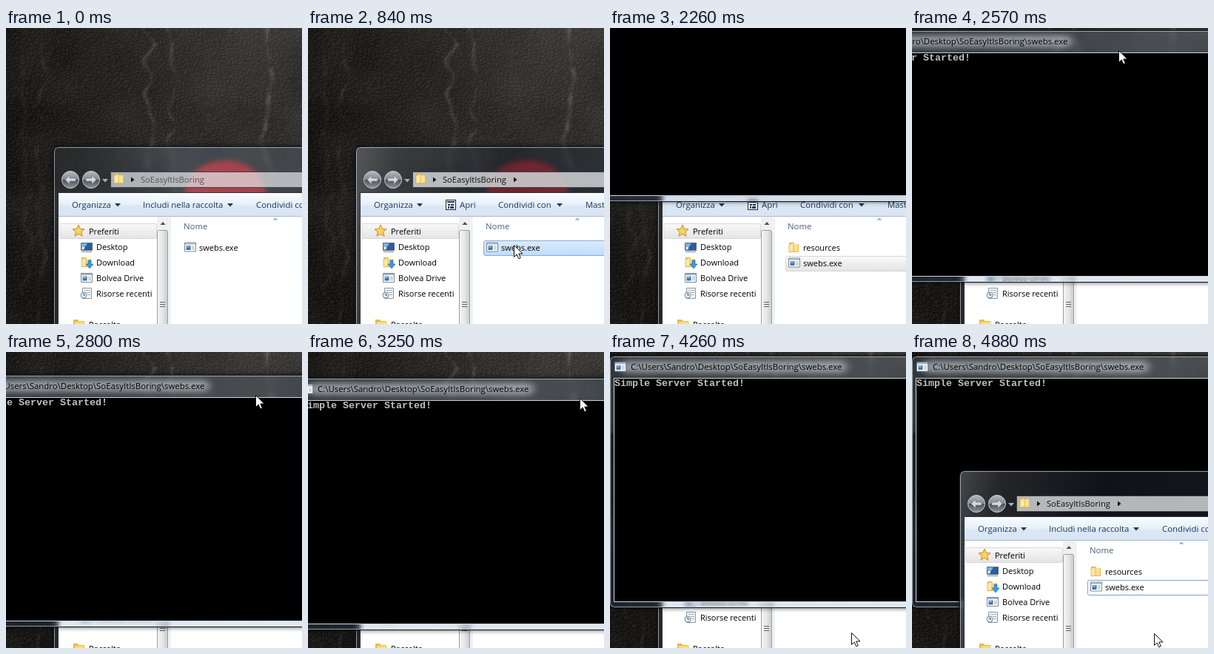
Write an HTML page with a canvas that moves like this. It is 400x400 px and loops after 5340 ms.

```html
<!DOCTYPE html>
<html lang="it">
<head>
<meta charset="utf-8">
<title>Simple Server</title>
<style>
html, body { margin: 0; width: 100%; height: 100%; overflow: hidden; background: #222; }
#stage { position: relative; width: 400px; height: 400px; overflow: hidden; }
#stage > *, svg { position: absolute; left: 0; top: 0; }
svg { overflow: visible; }
text { font: 11px "Open Sans", "Noto Sans", sans-serif; white-space: pre; }
.layer { width: 400px; height: 400px; }
.glass {
  position: absolute; box-sizing: border-box; border: 1px solid #15181b; border-radius: 7px;
  box-shadow: inset 0 0 0 1px rgba(215,228,240,.6), 0 0 6px rgba(0,0,0,.7);
  -webkit-backdrop-filter: blur(3px); backdrop-filter: blur(3px);
}
#explorer .glass {
  left: 64px; top: 160px; width: 420px; height: 320px;
  background: linear-gradient(100deg, rgba(110,125,140,.12) 5%, rgba(125,148,170,.3) 40%, rgba(100,120,140,.2));
}
#explorer.active .glass {
  background: linear-gradient(100deg, rgba(160,165,170,.42), rgba(120,125,135,.3) 12%, rgba(30,36,48,.5) 42%, rgba(50,62,78,.4));
}
#console .glass {
  left: -1px; top: 5px; width: 671px; height: 341px;
  background: linear-gradient(rgba(125,150,175,.22), rgba(150,170,190,.2) 30%, rgba(60,75,95,.2) 31%, rgba(70,110,170,.16));
}
.bar text { font-size: 11.4px; fill: #1e395b; }
.bar path { fill: #1e395b; }
#term { font: bold 13.33px "Liberation Mono", "DejaVu Sans Mono", monospace; fill: #c0c0c0; }
</style>
</head>
<body>
<div id="stage">
  <canvas id="wall" width="400" height="400"></canvas>

  <div id="explorer" class="layer">
    <div class="glass"></div>
    <svg width="400" height="400">
      <defs>
        <linearGradient id="gBar" x2="0" y2="1"><stop stop-color="#fafcfe"/><stop offset=".5" stop-color="#e6eff9"/><stop offset=".52" stop-color="#dce7f5"/><stop offset="1" stop-color="#d9e5f4"/></linearGradient>
        <linearGradient id="gGray" x2="0" y2="1"><stop stop-color="#f9f9f9"/><stop offset="1" stop-color="#e4e4e4"/></linearGradient>
        <linearGradient id="gHover" x2="0" y2="1"><stop stop-color="#fafbfd"/><stop offset="1" stop-color="#ebf3fd"/></linearGradient>
        <linearGradient id="gBlue" x2="0" y2="1"><stop stop-color="#dcebfc"/><stop offset="1" stop-color="#c1dbfc"/></linearGradient>
        <linearGradient id="gBtn" x2="0" y2="1"><stop stop-color="#b4babf"/><stop offset=".48" stop-color="#82898f"/><stop offset=".52" stop-color="#4c5359"/><stop offset="1" stop-color="#8d969d"/></linearGradient>
        <linearGradient id="gThumb"><stop stop-color="#f5f5f5"/><stop offset=".5" stop-color="#e6e7e8"/><stop offset="1" stop-color="#c9cbcf"/></linearGradient>
        <g id="folder">
          <path d="M1 2h6l1 2h6v11H1z" fill="#e6b94d"/><path d="M2 4h11v10H2z" fill="#f9e190"/>
          <path d="M1 15V5l6-3v12z" fill="#fbe9a8" stroke="#d9ab41" stroke-width=".7"/>
        </g>
        <g id="app">
          <path d="M.5 1.5h15v12H.5z" fill="#fff" stroke="#7e8790"/><path d="M1 2h14v2H1z" fill="#9fb3c6"/>
          <path d="M2.5 5.500h6v6h-6z" fill="#3f74a9"/><path d="M3 6h4v2H3z" fill="#8fbadd"/>
          <path d="M10 6.500h4M10 8.500h4M10 10.500h4" stroke="#a9b0b8"/>
        </g>
        <path id="down" d="M-4-2h8L0 2.500z"/>
      </defs>

      <circle cx="87" cy="205" r="11.500" fill="url(#gBtn)" stroke="#c6cdd2"/>
      <circle cx="115" cy="205" r="11.500" fill="url(#gBtn)" stroke="#c6cdd2"/>
      <path d="M80 205l6-6v4h8v4h-8v4zM122 205l-6-6v4h-8v4h8v4z" fill="#d4d8db" stroke="#6a7177" stroke-width=".6"/>
      <use href="#down" x="134" y="206" fill="#aab0b5"/>

      <rect id="address" x="141.500" y="194.500" width="280" height="21" stroke="#3c4146"/>
      <use href="#folder" x="145" y="195"/>
      <path d="M169 201.500l4.500 3.500-4.500 3.500z" fill="#111"/>
      <text id="crumb" x="182" y="209" style="font-size:11.150px">SoEasyItIsBoring</text>
      <path id="crumbEnd" d="M278 201.500l4.500 3.500-4.500 3.500z" fill="#111"/>

      <path d="M70.500 400V222.500H400" fill="none" stroke="#2d3339"/>
      <rect x="71" y="223" width="340" height="190" fill="#fff"/>
      <rect x="71" y="223" width="340" height="32" fill="url(#gBar)"/>
      <path d="M71 254.500H400" stroke="#a9bacd"/>
      <g class="bar">
        <text x="89" y="243">Organizza</text><use href="#down" x="151" y="239" fill="#1e395b"/>
        <g id="barIdle">
          <text x="185" y="243">Includi nella raccolta</text><use href="#down" x="303" y="239" fill="#1e395b"/>
          <text x="338" y="243">Condividi con</text>
        </g>
        <g id="barFile">
          <rect x="186.500" y="232.500" width="13" height="13" fill="#fff" stroke="#222"/>
          <path d="M188 234h10v2h-10zM189 238h3v2h-3zM193 238h4v2h-4zM189 241h2v3h-2zM192 241h5v3h-5z"/>
          <text x="205" y="243">Apri</text>
          <text x="257" y="243">Condividi con</text><use href="#down" x="340" y="239" fill="#1e395b"/>
          <text x="375" y="243">Masterizza</text>
        </g>
      </g>

      <rect x="72.500" y="264.500" width="131" height="20" rx="2" fill="url(#gGray)" stroke="#d6d6d6"/>
      <path d="M98 266l2.300 5.300 5.700.6-4.300 3.800 1.300 5.600-5-3-5 3 1.300-5.600-4.300-3.800 5.700-.6z" fill="#fbd35b" stroke="#c78a2b"/>
      <text x="112" y="279">Preferiti</text>
      <path d="M101.500 290.500h15v10h-15z" fill="#2c5f9e" stroke="#5d6873"/><path d="M102 291h8l-6 9h-2z" fill="#7fb1de"/>
      <path d="M103 296h3v3h-3z" fill="#e8f0f8"/><path d="M102 302.500h14" stroke="#7b8690"/>
      <text x="122" y="300">Desktop</text>
      <use href="#folder" x="101" y="308"/>
      <path d="M111 314h4v5h3l-5 6-5-6h3z" fill="#3c9be0" stroke="#1d67a8" stroke-width=".7"/>
      <text x="122" y="321">Download</text>
      <use href="#app" x="101" y="330"/>
      <text x="122" y="342">Bolvea Drive</text>
      <path d="M103.500 351.500h12v14h-12z" fill="#f2f5f8" stroke="#8b97a3"/>
      <path d="M106 354.500h8M109 357.500h5M110 360.500h4" stroke="#9fb0c0"/>
      <circle cx="105" cy="361" r="4" fill="#e2eef8" stroke="#6f8ba6"/><path d="M105 358.500v2.500h2" fill="none" stroke="#345"/>
      <text x="122" y="363">Risorse recenti</text>
      <path d="M91 394h6l1 2h8v8H91z" fill="#e6b94d"/><path d="M93 397h14v5H93z" fill="#f9dc7f"/>
      <text x="112" y="405">Raccolte</text>

      <rect x="204" y="255" width="16" height="150" fill="#f0f0f0"/>
      <path d="M208.500 266h7l-3.500-4z" fill="#4a4f55"/>
      <rect x="204.500" y="273.500" width="14" height="150" rx="2" fill="url(#gThumb)" stroke="#9a9da1"/>
      <path d="M208 370.500h7M208 373.500h7M208 376.500h7" stroke="#5c6268"/>
      <path d="M221.500 255V400" stroke="#d4e1f0"/>

      <rect id="head" x="223" y="255" width="200" height="25" fill="#e3f1fb"/>
      <path d="M360.500 259.500l3.500-3 3.500 3z" fill="#7fb2d8"/>
      <text x="240" y="272" style="font-size:11.400px" fill="#4c607a">Nome</text>
      <g id="res"><use href="#folder" x="241" y="288"/><text x="261" y="301">resources</text></g>
      <g id="file">
        <rect id="row" x="237.500" y="287.500" width="200" height="20" rx="2"/>
        <use href="#app" x="241" y="288.500"/><text x="261" y="301">swebs.exe</text>
      </g>
    </svg>
  </div>

  <div id="console" class="layer">
    <div class="glass"></div>
    <svg width="400" height="400">
      <defs><filter id="soft" x="-20%" y="-100%" width="140%" height="300%"><feGaussianBlur stdDeviation="6 4"/></filter></defs>
      <rect x="14" y="12" width="306" height="16" rx="8" fill="#e4ecf2" opacity=".55" filter="url(#soft)"/>
      <use href="#app" x="6" y="12.500"/>
      <text x="28" y="24" style="font-size:11.400px">C:\Users\Sandro\Desktop\SoEasyItIsBoring\swebs.exe</text>
      <rect x="5.500" y="35.500" width="658" height="302" stroke="#c9d6e0"/>
      <text id="term" x="6" y="46">Simple Server Started!</text>
      <rect x="646" y="36" width="17" height="301" fill="#f0f0f0"/>
      <rect x="646.500" y="320.500" width="16" height="16" fill="#f6f6f6" stroke="#e2e2e2"/>
      <path d="M651 327h7l-3.500 4z" fill="#3c4146"/>
    </svg>
  </div>

  <svg id="cursor" width="14" height="21" style="z-index:5">
    <path d="M.5.500v16l3.700-3.500 2.500 5.800 2.600-1.100-2.500-5.700h5.200z" fill="#fff" stroke="#111"/>
  </svg>
</div>

<script>
const $ = id => document.getElementById(id);
const LOOP = 5340;

// ---- leather wallpaper ----
function hash(x, y) {
  let n = Math.imul(x + 71, 374761393) ^ Math.imul(y + 13, 668265263);
  n = Math.imul(n ^ (n >>> 13), 1274126177);
  return ((n ^ (n >>> 16)) >>> 0) / 2 ** 32;
}
function noise(x, y) {
  const i = Math.floor(x), j = Math.floor(y), ease = u => u * u * (3 - 2 * u);
  const u = ease(x - i), v = ease(y - j);
  const mix = (a, b, k) => a + (b - a) * k;
  return mix(mix(hash(i, j), hash(i + 1, j), u), mix(hash(i, j + 1), hash(i + 1, j + 1), u), v);
}
// Height of a pebbled grain: low along cell borders.
function grain(x, y) {
  const px = x / 6 + noise(x / 9, y / 9) * 1.2, py = y / 5 + noise(y / 8, x / 8 + 40) * 1.2;
  const i = Math.floor(px), j = Math.floor(py);
  let near = 9, next = 9;
  for (let a = i - 1; a <= i + 1; a++) for (let b = j - 1; b <= j + 1; b++) {
    const d = Math.hypot(a + hash(a, b) - px, b + hash(b + 900, a) - py);
    if (d < near) { next = near; near = d; } else if (d < next) next = d;
  }
  return Math.min(1, (next - near) * 2.2);
}
function paintWall() {
  const N = 400, ctx = $('wall').getContext('2d'), img = ctx.createImageData(N, N);
  const streaks = [[192, 26], [223, 20], [352, 34], [48, 16], [28, 12]];
  const h = new Float32Array((N + 1) * (N + 1));
  for (let y = 0; y <= N; y++) for (let x = 0; x <= N; x++) h[y * (N + 1) + x] = grain(x, y);
  for (let y = 0; y < N; y++) for (let x = 0; x < N; x++) {
    const k = y * (N + 1) + x, relief = h[k + N + 2] - h[k];
    let v = 25 + 30 * Math.min(1, x / 280) * (1 - y / 600) + (noise(x / 40, y / 40) - .5) * 12;
    v += relief * 17 + (h[k] - .6) * 7 + (hash(x, y + 500) - .5) * 6;
    for (const [sx, power] of streaks) {
      const d = (x - sx - (noise(y / 22, sx) - .5) * 16) / 3;
      if (Math.abs(d) < 3) v += Math.exp(-d * d) * power * noise(y / 12, sx + 5);
    }
    img.data.set([v * 1.03, v, v * .96, 255], (y * N + x) * 4);
  }
  ctx.putImageData(img, 0, 0);
  ctx.fillStyle = '#b8252b';
  ctx.beginPath();
  ctx.ellipse(296, 222, 54, 43, 0, 0, 7);
  ctx.fill();
}

// ---- motion: [time, x, y], each held until the next ----
const drag = [[0, -282, -147], [2190, -255, -138], [2260, -215, -111], [2340, -183, -76], [2420, -150, -44],
  [2490, -125, -20], [2570, -103, -2], [2650, -80, 11], [2720, -58, 22], [2800, -45, 26], [2880, -34, 29],
  [2950, -25, 31], [3020, -19, 31], [3100, -16, 31], [3250, -15, 30], [3330, -11, 24], [3400, -7, 15],
  [3480, -4, 8], [3560, -1, 2], [3640, 0, 0]];
const pointer = [[0, 500, 262], [70, 392, 262], [140, 374, 292], [210, 346, 320], [290, 318, 333], [360, 300, 324],
  [430, 288, 308], [480, 281, 298], [540, 278, 293], [1710, 246, 112], [1780, 100, -115],
  [3790, 381, 48], [3870, 377, 92], [3950, 369, 158], [4030, 357, 235], [4100, 344, 306], [4180, 332, 357],
  [4260, 326, 379], [4800, 326, 380], [4880, 327, 380]];
const GRIP = [382, 32];

const looks = {
  none: ['none', 'none'], hover: ['url(#gHover)', '#b8d6fb'], picked: ['url(#gBlue)', '#84acdd'],
  idle: ['url(#gGray)', '#d6d6d6'], focus: ['#fff', '#7da2ce']
};
const rowSteps = [[0, 'none'], [430, 'hover'], [690, 'picked'], [1710, 'idle'], [4410, 'focus']];

const at = (steps, t) => steps.findLast(s => s[0] <= t);
const within = (t, a, b) => t >= a && t < b;
const show = (id, on) => $(id).style.display = on ? '' : 'none';

function draw(t) {
  const [, dx, dy] = at(drag, t);
  const held = within(t, 2190, 3790);
  const [, px, py] = held ? [0, dx + GRIP[0], dy + GRIP[1]] : at(pointer, t);
  $('cursor').style.transform = `translate(${px}px,${py}px)`;

  // The console fades and grows in, one step at a time.
  const grow = Math.min(1, Math.floor((t - 930) / 80) / 3);
  const con = $('console').style;
  show('console', grow > 0);
  con.opacity = grow >= 1 ? 1 : Math.max(0, grow);
  con.transformOrigin = '335px 175px';
  con.transform = `translate(${dx}px,${dy}px)` + (grow < 1 ? ` scale(${.9 + grow * .1})` : '');

  const active = within(t, 690, 1010) || t >= 4340;
  $('explorer').classList.toggle('active', active);
  $('explorer').style.zIndex = t >= 4340 ? 2 : 0;
  con.zIndex = 1;
  $('address').setAttribute('fill', active ? 'rgba(208,210,212,.86)' : 'rgba(235,238,240,.68)');
  $('crumb').setAttribute('fill', active ? '#111' : '#555');
  show('crumbEnd', active);

  const picked = within(t, 690, 4410);
  show('barFile', picked);
  show('barIdle', !picked);
  show('head', within(t, 70, 140));
  show('res', t >= 2020);
  $('file').setAttribute('transform', `translate(0,${t >= 2020 ? 21 : 0})`);
  const [fill, stroke] = looks[at(rowSteps, t)[1]];
  $('row').setAttribute('fill', fill);
  $('row').setAttribute('stroke', stroke);
}

paintWall();
const start = performance.now();
function tick() {
  draw((performance.now() - start) % LOOP);
  requestAnimationFrame(tick);
}
tick();
</script>
</body>
</html>
```
